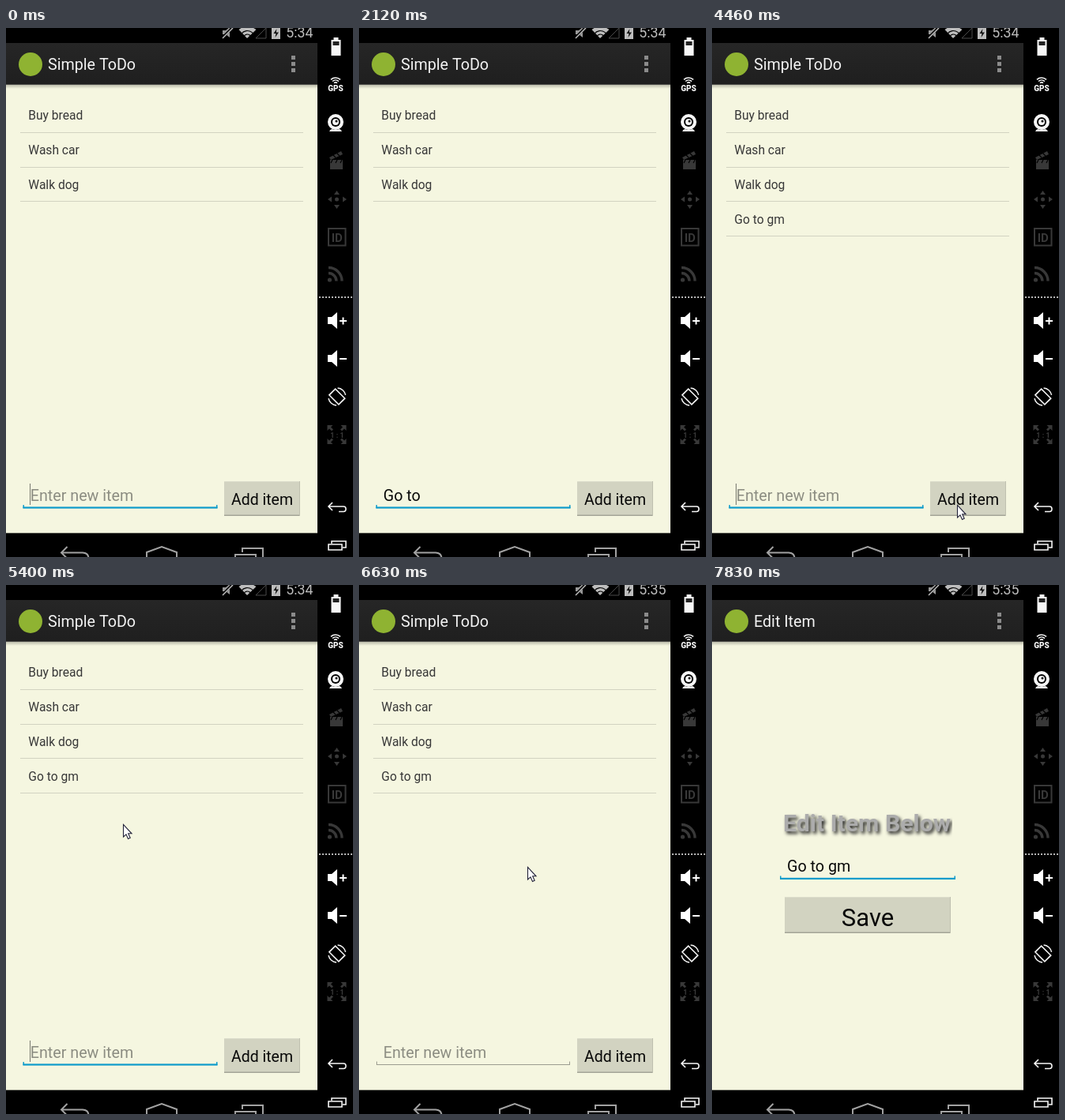
An HTML page with a canvas for the animation above (8000 ms loop, 439 px wide and 670 px high).

```html
<!DOCTYPE html>
<html lang="en">
<head>
<meta charset="utf-8">
<title>Simple ToDo</title>
<style>
html, body { margin: 0; width: 439px; height: 670px; overflow: hidden; background: #000; }
canvas { display: block; }
</style>
</head>
<body>
<canvas id="stage" width="439" height="670"></canvas>
<script>
const W = 439, H = 670, LOOP = 8000;
const CREAM = '#f5f6e0', BLUE = '#0c9bcb', DIM = '#383838';
const SIZE = 19.7;
const stage = document.getElementById('stage').getContext('2d');
const layer = document.createElement('canvas');
layer.width = W;
layer.height = H;
const editLayer = layer.getContext('2d');
let c = stage;

const TICKS = [0, 270, 740, 990, 1150, 1430, 1550, 2120, 2410, 2530,
  3060, 3200, 3330, 3490, 3660, 3780, 3920, 4050, 4310, 4460,
  4880, 5020, 5140, 5270, 5400, 5560, 5700, 5860,
  6000, 6140, 6270, 6390, 6510, 6630, 6780, 6910,
  7050, 7190, 7310, 7450, 7590, 7710, 7830];
const TYPED = [[740, 'G'], [990, 'Go'], [1150, 'Go '], [1430, 'Go t'],
  [1550, 'Go to '], [2410, 'Go to g'], [2530, 'Go to gm'], [4460, '']];
const CARET_ON = [[0, 270], [740, 2120], [2410, 3060], [3560, 4050], [4310, 4880], [5400, 5860]];
const MOUSE = [[3330, 376, 624], [3660, 309, 608], [3780, 310, 604], [4800, 310, 604],
  [5140, 222, 430], [5400, 148, 303], [5700, 139, 250], [5860, 138, 242], [6140, 138, 243],
  [6390, 170, 305], [6630, 213, 357], [6910, 340, 388], [7050, 396, 398]];

function rect(x, y, w, h, color) {
  c.fillStyle = color;
  c.fillRect(x, y, w, h);
}
function fill(path, color) {
  c.fillStyle = color;
  c.fill(new Path2D(path), 'evenodd');
}
function stroke(path, color, width = 2) {
  c.strokeStyle = color;
  c.lineWidth = width;
  c.stroke(new Path2D(path));
}
function disc(x, y, r, color) {
  c.fillStyle = color;
  c.beginPath();
  c.arc(x, y, r, 0, 7);
  c.fill();
}
function arc(x, y, r, a, b, color, width = 2) {
  c.strokeStyle = color;
  c.lineWidth = width;
  c.beginPath();
  c.arc(x, y, r, a, b);
  c.stroke();
}
function text(s, x, y, size, color, weight = 400, align = 'left') {
  c.font = `${weight} ${size}px Roboto, sans-serif`;
  c.textAlign = align;
  c.fillStyle = color;
  c.fillText(s, x, y);
}
function shade(y, h, from, to) {
  const g = c.createLinearGradient(0, y, 0, y + h);
  g.addColorStop(0, from);
  g.addColorStop(1, to);
  rect(0, y, 394, h, g);
}

function header(title) {
  shade(19, 53, '#262626', '#1f1f1f');
  rect(0, 71, 394, 1, '#4b4b47');
  shade(72, 5, 'rgba(0,0,0,0.24)', 'rgba(0,0,0,0)');
  disc(31, 46, 15, '#8fb332');
  text(title, 53, 53, SIZE, '#f3f3f3');
  for (const y of [35, 43, 51]) rect(361, y, 5, 5, '#8b8b8b');
}
function button(x, y, w, h, label, size, base, color = '#d2d3c1') {
  rect(x, y, w, h, color);
  rect(x, y, w, 1, '#dcddcb');
  rect(x, y + h - 2, w, 1, '#bcbdad');
  rect(x, y + h - 1, w, 1, '#a2a396');
  rect(x + w - 1, y, 1, h, '#bfc0b0');
  text(label, x + w / 2, base, size, '#080808', 400, 'center');
}
function field(x, y, w, focused) {
  const color = focused ? BLUE : '#9b9c90', h = focused ? 2.2 : 1, tick = focused ? 1.5 : 1;
  rect(x, y - h, w, h, color);
  rect(x, y - 4.5, tick, 4, color);
  rect(x + w - tick, y - 4.5, tick, 4, color);
}

function statusBar(t) {
  const g = '#bdbdbd';
  rect(0, 0, 394, 19, '#000');
  fill('M274 3h4l5 -4v13l-5 -4h-4z', '#999');
  stroke('M273 13L287 -1', '#000', 3);
  stroke('M274 13L287 0', g, 1.5);
  fill('M305 13L294.500 2Q305 -6 316.500 2z', g);
  for (const r of [5, 9.5]) arc(305.3, 13, r, -2.5, -0.6, '#000', 1.2);
  stroke('M316 13H329V0z', '#4a4a4a', 1);
  rect(336, 0, 11, 14, g);
  fill('M342.500 1l-4 6h3l-1 5l4.500 -6.500h-3.200z', '#111');
  text(t < 6270 ? '5:34' : '5:35', 388.5, 12, 17.8, g, 400, 'right');
}
function navBar() {
  rect(0, 640, 394, 30, '#000');
  rect(0, 639, 394, 1, '#a3a495');
  const g = '#a2a2a2';
  stroke('M77.500 657L70 664.500L77.500 672M71 664.500H97Q104.500 665 104.500 672', g);
  stroke('M178 672V664L197 657L216 664V672', g);
  stroke('M299 664V659H325V672M290 672V667H316V672', g);
}

function speaker(y, plus) {
  fill(`M407 ${y - 5}h5l7 -6v21l-7 -6h-5z`, '#fff');
  rect(422, y - 1, 9, 2, '#fff');
  if (plus) rect(425.5, y - 4.5, 2, 9, '#fff');
}
function sidebar() {
  rect(394, 0, 45, H, '#000');
  const w = '#f7f7f7';
  // battery
  rect(414.5, 12, 6, 3, w);
  rect(411.5, 15, 12, 20, w);
  rect(413.5, 17, 8, 5, '#222');
  // GPS
  for (const r of [3, 6, 9]) arc(417, 72, r, -2.3, -0.84, w, 1.6);
  text('GPS', 417, 80, 10, w, 900, 'center');
  // webcam
  disc(417, 119, 10, w);
  disc(417, 119, 6, '#000');
  disc(417, 119, 4, w);
  disc(418, 118, 1.5, '#000');
  fill('M409 131Q411 127 414 128.500H420Q423 127 425 131z', w);
  // clapper
  rect(410, 167, 16, 12, DIM);
  fill('M409 164L424 156L426 160L411 167z', DIM);
  stroke('M413 160l4 4M418 158l4 4M413 167l-2 4M419 167l-2 4M425 167l-2 4', '#000', 1.2);
  // move
  disc(418.5, 217, 2.5, DIM);
  fill('M418.500 206l3.500 5h-7zM418.500 229l3.500 -5h-7zM407 217l5 -3.500v7zM431 217l-5 -3.500v7z', DIM);
  // ID
  stroke('M408 254H429.500V275.500H408z', DIM, 2);
  text('ID', 418.8, 270.5, 15, DIM, 700, 'center');
  // feed
  disc(409.5, 319, 2.6, DIM);
  for (const r of [10, 17]) arc(408, 320.5, r, -1.57, 0, DIM, 3.4);
  for (let x = 396; x < 439; x += 4) rect(x, 340, 2, 2, '#b5b5b5');
  speaker(371, true);
  speaker(419, false);
  // rotate
  c.save();
  c.translate(418.8, 467);
  c.rotate(-0.785);
  c.strokeStyle = w;
  c.lineWidth = 1.6;
  c.strokeRect(-5.5, -8.5, 11, 17);
  c.restore();
  arc(418.8, 467, 11, -1.5, -0.2, w, 1.5);
  arc(418.8, 467, 11, 1.64, 2.94, w, 1.5);
  // full size
  for (const sx of [-1, 1]) for (const sy of [-1, 1]) {
    c.save();
    c.translate(418.5, 515);
    c.scale(sx, sy);
    fill('M12 12v-7l-2.500 2.500l-3 -3l-2 2l3 3l-2.500 2.500z', DIM);
    c.restore();
  }
  rect(407, 510, 24, 10, '#000');
  text('1 : 1', 419, 518.5, 9, DIM, 700, 'center');
  // back and recent apps
  stroke('M413 601L408 606L413 611M408 606H427Q430 606 430 609Q430 612.500 427 612.500H421', w, 1.6);
  stroke('M412 653V650H430V658H426M408 654H425V661H408z', w, 1.6);
}

function listScreen(t) {
  rect(0, 19, 394, 621, CREAM);
  header('Simple ToDo');
  const rows = ['Buy bread', 'Wash car', 'Walk dog'];
  if (t >= 4460) rows.push('Go to gm');
  rows.forEach((s, i) => {
    const y = 131.85 + i * 43.76;
    if (i === 3 && t >= 6000 && t < 6140) rect(18, Math.round(y) - 43, 358, 43, '#a9d9e2');
    text(s, 28.3, Math.round(y - 15.5), 15.6, '#373737');
    rect(18, Math.round(y), 358, 1, '#d2d3c1');
  });

  const last = TYPED.filter(k => k[0] <= t).pop();
  const typed = last ? last[1] : '';
  text(typed || 'Enter new item', 30.8, 599, SIZE, typed ? '#0a0a0a' : '#8c8d82');
  if (CARET_ON.some(([a, b]) => t >= a && t < b)) {
    rect(Math.floor(30 + c.measureText(typed).width), 577, 1, 27, '#77786e');
  }
  if (t < 6390) field(21.5, 608.6, 246, true);
  else field(22, 608, 245, false);
  const pressed = t >= 4310 && t < 4460;
  button(276, 574, 96, 44, 'Add item', 19.5, 603.5, pressed ? '#8fc6d4' : undefined);
}

function editScreen(t) {
  rect(0, 19, 394, 621, CREAM);
  header('Edit Item');
  c.save();
  c.beginPath();
  c.rect(80, 280, 224, 45);
  c.clip();
  c.shadowColor = '#222';
  c.shadowOffsetX = c.shadowOffsetY = 2.5;
  c.shadowBlur = 4;
  text('Edit Item Below', 90, 312, 30.3, '#acacac', 700);
  c.restore();
  text('Go to gm', 95, 363, SIZE, '#0a0a0a');
  if (t < 7830) rect(175, 341, 1, 27, '#55564e');
  field(86, 373, 222, true);
  button(92, 395, 210, 46, 'Save', 31, 432);
}

function mouse(t) {
  const i = MOUSE.findIndex(k => k[0] >= t);
  if (i < 0 || t < MOUSE[0][0]) return;
  const b = MOUSE[i], a = MOUSE[i - 1] || b;
  const u = (t - a[0]) / (b[0] - a[0] || 1);
  c.save();
  c.translate(Math.round(a[1] + (b[1] - a[1]) * u) + 0.5, Math.round(a[2] + (b[2] - a[2]) * u) + 0.5);
  const arrow = 'M0 0V15.500L3.500 12.300L6 18L8.700 16.800L6.200 11.300H10.500z';
  fill(arrow, '#fff');
  stroke(arrow, '#23233a', 1.1);
  c.restore();
}

function draw(t) {
  c = stage;
  const x = Math.min(1, Math.max(0, (t - 7378) / 300));
  const p = 1 - (1 - x) ** 2;
  if (p < 1) listScreen(t);
  if (p > 0) {
    rect(0, 19, 394, 621, `rgba(0,0,0,${0.1 * p})`);
    c = editLayer;
    editScreen(t);
    c = stage;
    const s = 0.79 + 0.21 * p;
    c.save();
    c.globalAlpha = p;
    c.translate(197, 318);
    c.scale(s, s);
    c.drawImage(layer, 0, 19, 394, 621, -197, -299, 394, 621);
    c.restore();
  }
  statusBar(t);
  navBar();
  sidebar();
  mouse(t);
}

const start = performance.now();
function frame(now) {
  const t = Math.max(0, now - start) % LOOP;
  draw(TICKS.filter(k => k <= t).pop());
  requestAnimationFrame(frame);
}
draw(0);
requestAnimationFrame(frame);
</script>
</body>
</html>
```
